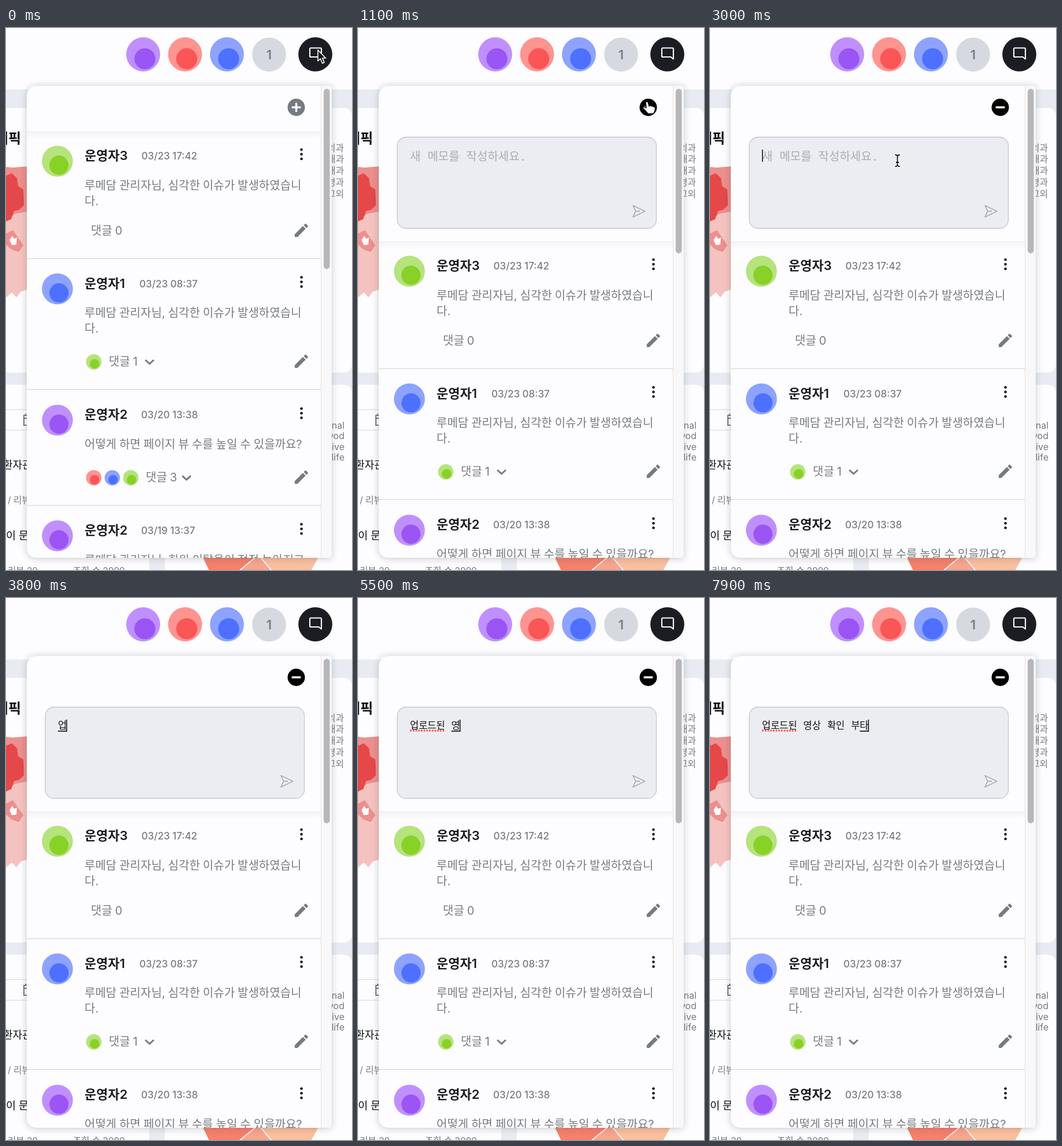
These frames come from a looping animation (599 by 936 pixels, 8000 ms). An HTML page:

```html
<!DOCTYPE html>
<html lang="ko">
<head>
<meta charset="utf-8">
<style>
  html, body { margin: 0; width: 100%; height: 100%; overflow: hidden; background: #fdfcff; }
  svg { display: block; width: 599px; height: 936px; }
  text { font-family: Inter, "Noto Sans CJK KR", "Noto Sans CJK", sans-serif; fill: #777c82; }
  .body { font-size: 20px; word-spacing: -.6px; }
  .mono { font-family: "Liberation Mono", "Noto Sans CJK KR", "Noto Sans CJK", monospace; }
</style>
</head>
<body>
<svg id="stage" viewBox="0 0 599 936"></svg>
<script>
const LOOP = 8000, OPEN_SHIFT = 190;
const PRESS = 950, OPEN = 1100, FOCUS = 1600, TYPE = 3300;
const GREY = '#757b82', WHITE = '#fdfcff', DARK = '#1b1d23';
// Each user colour: pale disc, strong centre
const PURPLE = ['#bf90fd', '#9a55f4'], RED = ['#fd9490', '#fa5557'];
const BLUE = ['#8da3ff', '#4d70ff'], GREEN = ['#b5e37c', '#88d126'];

const text = (x, y, size, str, extra = '') =>
  `<text x="${x}" y="${y}" font-size="${size}" ${extra}>${str}</text>`;
const disc = (x, y, r, fill) => `<circle cx="${x}" cy="${y}" r="${r}" fill="${fill}"/>`;
const rect = (x, y, w, h, fill, extra = '') =>
  `<rect x="${x}" y="${y}" width="${w}" height="${h}" fill="${fill}" ${extra}/>`;
const path = (d, fill, extra = '') => `<path d="${d}" fill="${fill}" ${extra}/>`;
const avatar = (x, y, r, [pale, strong]) =>
  disc(x, y, r, pale) + disc(x + r * .1, y + r * .26, r * .62, strong);

const pencil = y => path(
  'M3 17.25V21h3.75L17.81 9.94l-3.75-3.75zM20.71 7.04a1 1 0 0 0 0-1.41l-2.34-2.34a1 1 0 0 0-1.41 0l-1.83 1.83 3.75 3.75z',
  GREY, `transform="translate(496 ${y - 15.4}) scale(1.28)"`);

// One memo; y is its top edge, h its height
function memo({ y, h, color, name, date, dateX, lines, replies, minis }) {
  const foot = h - 48, countX = minis.length ? 146 + 32 * minis.length : 147;
  return `<g transform="translate(0 ${y})">` +
    avatar(89, 52, 26.8, color) +
    text(136, 50, 22, name, `font-weight="600" style="fill:${DARK}"`) +
    text(dateX, 49.3, 17, date, 'font-weight="500"') +
    [32, 40, 48].map(d => disc(511.5, d, 2.3, '#111')).join('') +
    lines.map((line, i) => text(136, 100.5 + 27 * i, 20, line, 'class="body"')).join('') +
    minis.map((c, i) => avatar(152 + 32 * i, foot, 13.3, c)).join('') +
    text(countX, foot + 6.5, 20, '댓글 ' + replies, 'class="body"') +
    (minis.length ? path(`M${countX + 64} ${foot - 2.5}l6.5 6 6.5-6`, 'none',
      `stroke="${GREY}" stroke-width="3" stroke-linecap="round" stroke-linejoin="round"`) : '') +
    pencil(foot - 1) +
    rect(36, h - 1, 509, 1.5, '#dbdee3') + '</g>';
}

const alertLines = ['루메담 관리자님, 심각한 이슈가 발생하였습니', '다.'];
const memos = [
  { y: 178, h: 220.5, color: GREEN, name: '운영자3', date: '03/23 17:42', dateX: 234.5,
    lines: alertLines, replies: 0, minis: [] },
  { y: 398.5, h: 226, color: BLUE, name: '운영자1', date: '03/23 08:37', dateX: 231,
    lines: alertLines, replies: 1, minis: [GREEN] },
  { y: 625.2, h: 199.5, color: PURPLE, name: '운영자2', date: '03/20 13:38', dateX: 234,
    lines: ['어떻게 하면 페이지 뷰 수를 높일 수 있을까요?'], replies: 3, minis: [RED, BLUE, GREEN] },
  { y: 825, h: 226, color: PURPLE, name: '운영자2', date: '03/19 13:37', dateX: 234,
    lines: ['루메담 관리자님, 회원 이탈율이 점점 높아지고'], replies: 0, minis: [] },
];

const endAt = (x, str, y, size) => text(x, y, size, str, 'text-anchor="end"');
const page =
  rect(0, 0, 599, 936, '#e8ecf2') +
  rect(0, 0, 599, 106, WHITE) +
  rect(-20, 138, 619, 457, WHITE, 'rx="14"') +
  rect(-20, 616, 268, 360, WHITE, 'rx="14"') +
  rect(275, 616, 324, 360, WHITE, 'rx="14"') +
  text(26, 199, 24, '트래픽', 'text-anchor="end" font-weight="700" style="fill:#111"') +
  path('M0 240l12 1 24-2v140l-12 4-10 20-14 14z', '#ec8f8e') +
  path('M0 335l15-14 21-4v150l-9-4-7 10-8-5-12 10z', '#f5c3bf') +
  path('M0 255l10-4 9 8 2 14 9 6 1 27-8 8-9 2-5 14-9 4z', '#e5484a') +
  path('M0 355l12-6 8 12 10 14-8 12-13-5-9-8z', '#ec8f8e') +
  path('M6 366l5-7 3 5 5-2-1 12-8 1zM0 465l10-8 8 8 8-10 10-3v60H0z', WHITE) +
  ['외과', '내과', '내과', '신경과', '그외'].map((s, i) => endAt(585, s, 212.5 + 19.8 * i, 15.6)).join('') +
  ['nal', 'vod', 'ive', 'life'].map((s, i) => endAt(586, s, 692 + 18.4 * i, 16)).join('') +
  rect(0, 658.5, 40, 1, '#d3d7dc') + rect(0, 694, 40, 1, '#d3d7dc') +
  path('M40 669H31V686H40M31 674H40M34 666V670', 'none', `stroke="${GREY}" stroke-width="2"`) +
  text(-5, 761, 18, '환자관리', 'font-weight="500" style="fill:#111"') +
  text(3, 821, 15.5, '/ 리뷰') +
  text(0, 883, 18.5, '이 문의', 'font-weight="500" style="fill:#111"') +
  text(3, 943, 15.5, '리뷰 20') + text(116, 943, 15.5, '조회 수 2099') +
  `<g stroke="${WHITE}" stroke-width="1.5">` +
  path('M338 910H437L404 937H351Z', '#f5806c') +
  path('M437 910L404 937H460Z', '#f7a68e') +
  path('M437 910H544L529 937H460Z', '#fbbfa0') + '</g>' +
  [PURPLE, RED, BLUE].map((c, i) => avatar(237.5 + 72.5 * i, 45.5, 29.4, c)).join('') +
  disc(455.5, 45.8, 29.4, '#d6dae0') +
  text(455.5, 54, 22, '1', 'text-anchor="middle" font-weight="600"') +
  disc(535.5, 45.5, 29.4, DARK) +
  path('M527.5 34.5H544.5Q546 34.5 546 36V53.5L541.5 50H527.5Q526 50 526 48.5V36Q526 34.5 527.5 34.5Z',
    'none', `stroke="${WHITE}" stroke-width="2.1" stroke-linejoin="round"`);

const shell = 'M56 100H559Q563.5 100 563.5 105V909Q563.5 915 557 915H56Q36 915 36 895V120Q36 100 56 100Z';
const panel =
  path(shell, WHITE, 'filter="url(#drop)"') +
  '<g clip-path="url(#shell)">' +
  `<g id="list">${memos.map(memo).join('')}${rect(36, 178, 509, 14, 'url(#fade)')}</g>` +
  rect(36, 100, 509, 78, WHITE, 'id="head"') +
  '<g id="editor">' +
  rect(68, 188.5, 448.5, 157.5, '#ecedf2', 'rx="15" stroke="#c3c7cd" stroke-width="1.3"') +
  path('M476 306.5L497 316.5 476 326.5 480.5 316.5ZM480.5 316.5H488', 'none',
    'stroke="#abafb7" stroke-width="1.8" stroke-linejoin="round"') +
  text(90, 229, 20, '새 메모를 작성하세요.', 'id="hint" class="mono" style="fill:#a9acb1"') +
  text(90, 226, 16.5, '', 'id="typed" class="mono" style="fill:#111;word-spacing:1px"') +
  path('M91.5 229H148', 'none',
    'id="spell" stroke="#fb5a50" stroke-width="3.4" stroke-linecap="round" stroke-dasharray="0 4.7"') +
  rect(0, 229, 15.2, 1.8, '#222', 'id="compose"') +
  rect(90, 210, 1.6, 21, '#111', 'id="caret"') + '</g>' +
  rect(545, 100, 19, 815, '#f8f7fa') + rect(545, 100, 1, 815, '#e2e3e7') +
  rect(550, 105, 10.5, 311, '#b7b7ba', 'id="thumb" rx="5.2"') + '</g>' +
  '<circle id="toggle" cx="502.5" cy="137" r="15"/>' +
  path('M496 137H509', 'none', `stroke="${WHITE}" stroke-width="3.4" stroke-linecap="round"`) +
  path('M502.5 130.5V143.5', 'none', `id="plus" stroke="${WHITE}" stroke-width="3.4" stroke-linecap="round"`);

// Each pointer is drawn around its hot spot
const pointers =
  '<circle id="ring" cx="500" cy="125.5" r="40.5" fill="none" stroke="#111" stroke-width="1.8"/>' +
  '<g id="pointer">' +
  path('M0 0V19L4.4 15 7.6 23 11 21.6 7.8 14H13.5Z', '#111',
    'id="arrow" stroke="#fff" stroke-width="1.6" stroke-linejoin="round"') +
  path('M-1 1Q1-1 3 1L5 8Q7 6 9 8 11 7 12.5 9 15 8.5 15.5 11L15 16 12.5 21H3L-2 15-6 11Q-5 8-2 10L0 11Z', '#fff',
    'id="hand" stroke="#111" stroke-width="1.5" stroke-linejoin="round"') +
  '<g id="beam" fill="none">' +
  ['#fff" stroke-width="3.6', '#111" stroke-width="1.8'].map(s =>
    path('M-4-10Q0-10 0-7 0-10 4-10M0-7V7M-4 10Q0 10 0 7 0 10 4 10M-2.5 3H2.5', 'none', `stroke="${s}"`)).join('') +
  '</g></g>';

const stage = document.getElementById('stage');
stage.innerHTML = `<defs>
  <filter id="drop" x="-10%" y="-10%" width="120%" height="120%">
    <feDropShadow dx="0" dy="1" stdDeviation="6" flood-color="#30343c" flood-opacity=".28"/></filter>
  <linearGradient id="fade" x2="0" y2="1">
    <stop stop-color="#f3f3f6"/><stop offset="1" stop-color="#f3f3f6" stop-opacity="0"/></linearGradient>
  <clipPath id="shell"><path d="${shell}"/></clipPath>
</defs>` + page + panel + pointers;

const el = {};
stage.querySelectorAll('[id]').forEach(node => el[node.id] = node);
const show = (node, on) => node.setAttribute('display', on ? 'inline' : 'none');

// Keystrokes: the forms each syllable takes while it is composed
const message = '업로드된 영상 확인 부탁';
const forms = ['ㅇ어업', 'ㄹ로롣', '드듣', '도되된', ' ', 'ㅇ여영', 'ㅅ사상', ' ', 'ㅎ호화확', 'ㅇ이인', ' ', 'ㅂ부붙', '타'];
const states = forms.flatMap((f, i) => [...f].map(c => message.slice(0, i) + c));

// Linear or eased lookup in [key, ...values] rows
const ease = u => u * u * (3 - 2 * u);
function track(rows, t, curve = u => u) {
  const i = rows.findIndex(r => r[0] > t);
  if (i < 0) return rows[rows.length - 1].slice(1);
  if (i === 0) return rows[0].slice(1);
  const a = rows[i - 1], b = rows[i], u = curve((t - a[0]) / (b[0] - a[0]));
  return a.slice(1).map((v, k) => v + (b[k + 1] - v) * u);
}
const route = [[0, 540, 38], [350, 540, 38], [900, 499, 127], [1150, 499, 127], [1700, 324.5, 229]];
const keyTimes = [[TYPE - 1, 0], [TYPE, 1], [3700, 3], [5480, 15], [6690, 24], [7800, 31]];

function draw(t) {
  const opened = t >= OPEN, shift = opened ? OPEN_SHIFT : 0;
  el.list.setAttribute('transform', `translate(0 ${shift})`);
  el.head.setAttribute('height', 78 + shift);
  el.thumb.setAttribute('height', opened ? 284 : 311);
  show(el.editor, opened);

  const [x, y] = track(route, t, ease);
  const overToggle = Math.hypot(x - 502.5, y - 137) < 16;
  const overInput = opened && x < 516 && y > 188;
  el.pointer.setAttribute('transform', `translate(${x} ${y})`);
  show(el.arrow, !overToggle && !overInput);
  show(el.hand, overToggle);
  show(el.beam, t < TYPE && overInput);
  show(el.ring, t >= PRESS && t < OPEN);
  el.toggle.setAttribute('fill', opened || overToggle ? '#000' : GREY);
  show(el.plus, !opened);

  const keys = Math.floor(track(keyTimes, t)[0] + 1e-6);
  const value = keys ? states[keys - 1] : '';
  el.typed.textContent = value.replace(/ /g, '\u00a0');
  const end = 90 + (keys ? el.typed.getComputedTextLength() : 0);
  show(el.hint, !keys);
  show(el.spell, value.includes(' '));
  show(el.compose, keys && !value.endsWith(' '));
  el.compose.setAttribute('x', end - 15.2);
  el.caret.setAttribute('x', end - (keys ? 1 : 0));
  show(el.caret, keys || (t >= FOCUS && Math.floor((t - FOCUS) / 500) % 2 === 0));
}

function loop() {
  draw(performance.now() % LOOP);
  requestAnimationFrame(loop);
}
loop();
</script>
</body>
</html>
```
